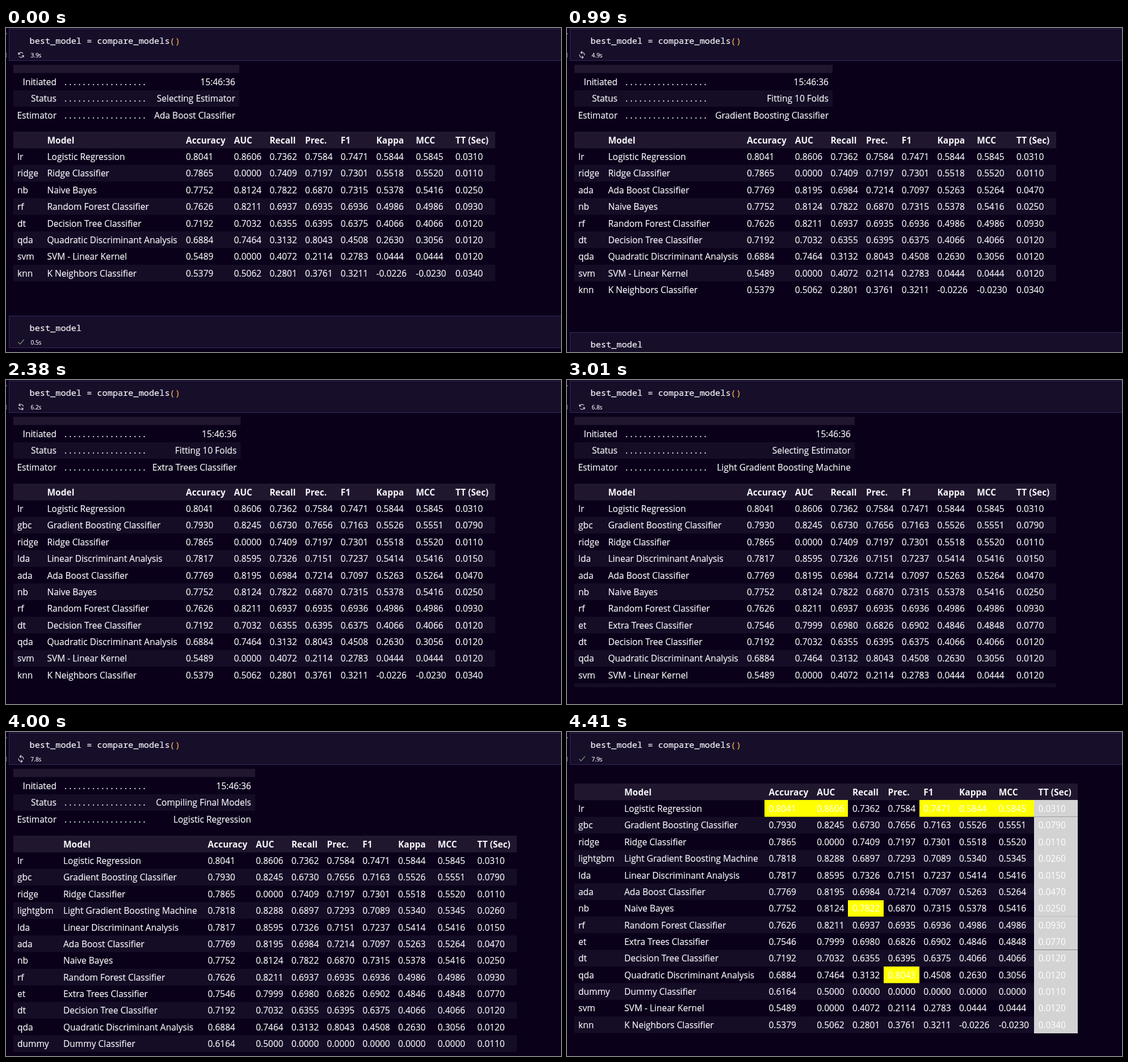
An HTML page that plays this animation: 978x572 px, repeating every 5.62 s.

```html
<!DOCTYPE html>
<html lang="en">
<head>
<meta charset="utf-8">
<title>Model comparison</title>
<style>
  html, body { margin: 0; width: 100%; height: 100%; overflow: hidden; background: #0a001a; }
  svg { display: block; }
  text { font: 15.5px "Open Sans", sans-serif; fill: #f6f5f8; stroke: #f6f5f8; stroke-width: .2px; white-space: pre; }
  .bold { font-weight: 700; stroke: none; }
  .code { font: 15.25px "Noto Sans Mono", monospace; }
  .small { font-size: 10px; }
  .end { text-anchor: end; }
  .lit { fill: #fff; stroke: none; }
  .paren { fill: #e8b04c; stroke: #e8b04c; }
</style>
</head>
<body>
<svg id="stage" width="978" height="572" viewBox="0 0 978 572"></svg>
<script>
const LOOP = 5620, TICK = 70, ROW = 29.36, LAYOUT_LAG = 140;
const FINAL_AT = 4130, DONE_AT = 4410;
const POSITIVES = .3836; // share of positive samples
const BG = '#0a001a', CELL = '#170e2a', BORDER = '#372a55', HEAD = '#20172f', STRIPE = '#150c26';
const MARK = '#77717f';

// F1, kappa and MCC follow from the confusion matrix.
function metrics(accuracy, auc, recall, precision, seconds) {
  const tp = POSITIVES * recall, fn = POSITIVES - tp, fp = 1 - accuracy - fn;
  const called = tp + fp;
  const chance = POSITIVES * called + (1 - POSITIVES) * (1 - called);
  const f1 = 2 * precision * recall / (precision + recall);
  const kappa = (accuracy - chance) / (1 - chance);
  const mcc = (tp - POSITIVES * called) /
    Math.sqrt(POSITIVES * (1 - POSITIVES) * called * (1 - called));
  return [accuracy, auc, recall, precision, f1, kappa, mcc, seconds]
    .map(v => Math.round((v || 0) * 1e4) / 1e4);
}

// id, name, then accuracy, AUC, recall, precision and training time in 1/10000
const models = `lr|Logistic Regression|8041 8606 7362 7584 310
gbc|Gradient Boosting Classifier|7930 8245 6730 7656 790
ridge|Ridge Classifier|7865 0 7409 7197 110
lightgbm|Light Gradient Boosting Machine|7818 8288 6897 7293 260
lda|Linear Discriminant Analysis|7817 8595 7326 7151 150
ada|Ada Boost Classifier|7769 8195 6984 7214 470
nb|Naive Bayes|7752 8124 7822 6870 250
rf|Random Forest Classifier|7626 8211 6937 6935 930
et|Extra Trees Classifier|7546 7999 6980 6826 770
dt|Decision Tree Classifier|7192 7032 6355 6395 120
qda|Quadratic Discriminant Analysis|6884 7464 3132 8043 120
dummy|Dummy Classifier|6164 5000 0 0 110
svm|SVM - Linear Kernel|5489 0 4072 2114 120
knn|K Neighbors Classifier|5379 5062 2801 3761 340`.split('\n').map(line => {
  const [id, name, measured] = line.split('|');
  return { id, name, scores: metrics(...measured.split(' ').map(v => v / 1e4)) };
});

// Each estimator starts fitting at its time; its row joins when the next one starts.
const steps = [
  { at: 0, id: 'ada', right: 404 },
  { at: 700, id: 'gbc', right: 461 },
  { at: 1680, id: 'lda', right: 462.5 },
  { at: 2100, id: 'et', right: 406.5 },
  { at: 3010, id: 'lightgbm', right: 500 },
  { at: 3570, id: 'dummy', right: 400 },
  { at: 3850, id: 'lr', right: 432 }
];

const headings = ['Accuracy', 'AUC', 'Recall', 'Prec.', 'F1', 'Kappa', 'MCC', 'TT (Sec)'];
const extraWidth = { Accuracy: 22, Kappa: 7, MCC: 7 };
let nextX = 317;
const columns = headings.map(h => {
  const x = nextX;
  nextX += 62.7 + (extraWidth[h] || 0);
  return x;
});
const best = headings.map((_, c) => Math.max(...models.map(m => m.scores[c])));

const rect = (x, y, w, h, fill) =>
  `<rect x="${x}" y="${y}" width="${w}" height="${h}" fill="${fill}"/>`;
const text = (x, y, str, cls = '') => `<text x="${x}" y="${y}" class="${cls}">${str}</text>`;

const check = y =>
  `<path d="M21.5 ${y + .5}l3.2 3.7 7-8.2" fill="none" stroke="#7f9a72" stroke-width="1.2"/>`;

function spinner(t) {
  const half = 'M-4.3 -.2A4.3 4.3 0 0 1 3.5 -2.5M-4.6 -4.6V-1.2H-1.2';
  const angle = Math.floor(t / 50) * 12;
  return `<g transform="translate(26.5 47.5) rotate(${angle})" fill="none" stroke="#d5d2dc" stroke-width="1.1">
    <path d="${half}"/><path d="${half}" transform="rotate(180)"/></g>`;
}

function codeCell(y, code, seconds, icon) {
  return `<rect x="5.5" y="${y + .5}" width="980" height="56" fill="${CELL}" stroke="${BORDER}"/>` +
    text(41.5, y + 27, code, 'code') + icon + text(43.5, y + 51, seconds + 's', 'small');
}

function monitor(step, t) {
  const status = step.id === 'lr' ? 'Compiling Final Models'
    : t < step.at + TICK ? 'Selecting Estimator' : 'Fitting 10 Folds';
  const estimator = models.find(m => m.id === step.id).name;
  const width = step.right + 7 - 13;
  const lines = [['Initiated', '15:46:36'], ['Status', status], ['Estimator', estimator]];
  return rect(13, 65, width, 14.5, HEAD) + rect(13, 110, width, 29, STRIPE) +
    lines.map(([label, value], i) => {
      const y = 101 + i * ROW;
      return text(89, y, label, 'end') + text(103, y, '. '.repeat(18).trim()) +
        text(step.right, y, value, 'end');
    }).join('');
}

function table(rows, top, final) {
  const wide = rows.some(m => m.id === 'lightgbm');
  const nameX = wide ? 101 : 72.5;
  const xs = columns.map(x => x + (wide ? 38.5 : 0));
  const right = wide ? 900 : 862;
  const edges = [...xs.map(x => Math.round(x - 7.5)), right];
  let out = rect(13, top, right - 13, ROW, HEAD) + text(nameX, top + 20.7, 'Model', 'bold') +
    headings.map((h, i) => text(xs[i], top + 20.7, h, 'bold')).join('');
  rows.forEach((m, i) => {
    const y = top + (i + 1) * ROW, base = y + 20.7;
    if (i % 2) out += rect(13, y, right - 13, ROW, STRIPE);
    out += text(20, base, m.id) + text(nameX, base, m.name);
    m.scores.forEach((score, c) => {
      const fill = final && (c === 7 ? '#d3d3d3' : score === best[c] && '#ff0');
      if (fill) out += rect(edges[c], Math.round(y), edges[c + 1] - edges[c], 30, fill);
      out += text(xs[c], base, score.toFixed(4), fill ? 'lit' : '');
    });
  });
  return out;
}

function scene(t) {
  const final = t >= FINAL_AT;
  const k = steps.findLastIndex(s => t >= s.at);
  const pending = steps.slice(k, 6).map(s => s.id);
  const rows = models.filter(m => !pending.includes(m.id));
  const seconds = Math.min(7.9, Math.floor((3.95 + .975 * t / 1000) * 10) / 10).toFixed(1);

  let out = final ? table(rows, 91, true) : monitor(steps[k], t) + table(rows, 183, false);
  if (!final) {
    // The output area grows a moment after its table does.
    const late = k > 0 && t < steps[k].at + LAYOUT_LAG;
    const bottom = 183 + (rows.length + (late ? 0 : 1)) * ROW;
    if (bottom < 560) out += rect(0, bottom + 7, 978, 572, BG);
    out += codeCell(Math.round(bottom + 60.5), 'best_model', '0.5', check(Math.round(bottom + 107)));
  }
  return out + rect(0, 9, 1.5, 2, MARK) + rect(0, 44, 1, 8, MARK) +
    codeCell(1, 'best_model = compare_models<tspan class="paren">()</tspan>', seconds,
      t < DONE_AT ? spinner(t) : check(47));
}

const stage = document.getElementById('stage');
let shown = -1;
function draw() {
  const t = Math.min(Math.floor(performance.now() % LOOP / TICK) * TICK, DONE_AT);
  if (t !== shown) stage.innerHTML = scene(shown = t);
  requestAnimationFrame(draw);
}
draw();
</script>
</body>
</html>
```
